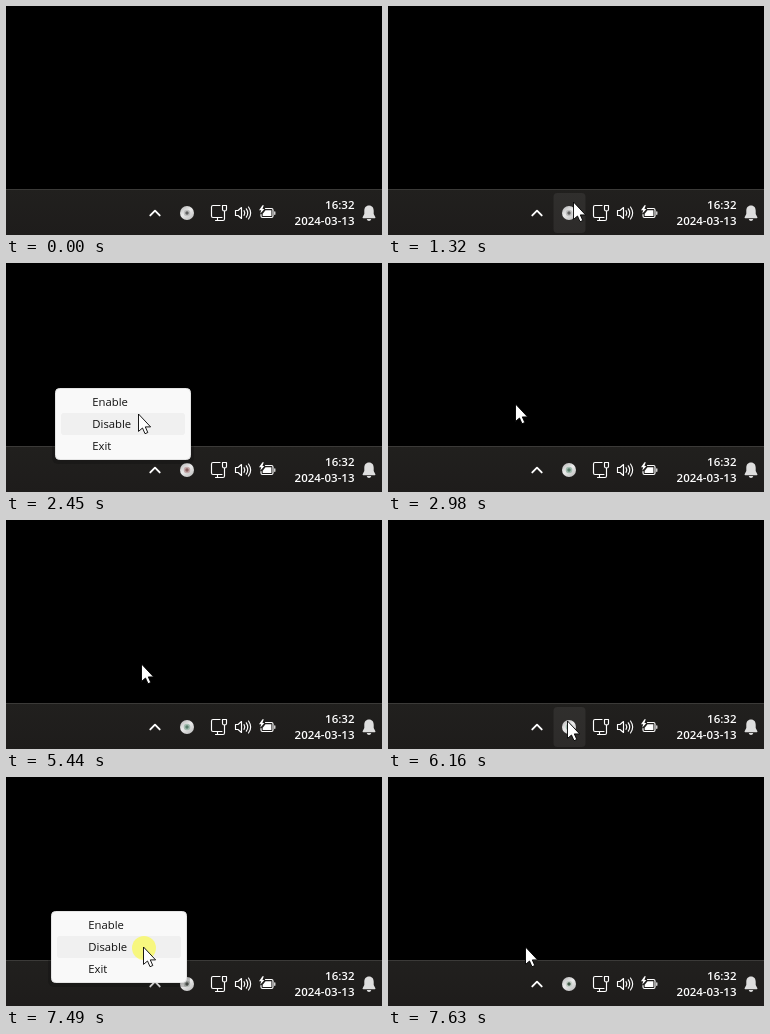
An HTML page for the animation above (8000 ms loop, 376 px wide and 229 px high).

```html
<!DOCTYPE html>
<html lang="en">
<head>
<meta charset="utf-8">
<title>Tray menu</title>
<style>
  html, body { margin: 0; width: 100%; height: 100%; overflow: hidden; background: #000; }
  svg { display: block; width: 376px; height: 229px; }
  text { font-family: "Open Sans", "Noto Sans", sans-serif; }
  .clock { font-size: 11.5px; font-weight: 600; fill: #fff; text-anchor: end; }
  .item { font-size: 11.3px; font-weight: 500; fill: #111; }
  .line { fill: none; stroke: #fff; stroke-width: 1.15; stroke-linejoin: round; stroke-linecap: round; }
</style>
</head>
<body>
<svg viewBox="0 0 376 229">
  <defs>
    <linearGradient id="bar" x2="0" y2="1">
      <stop offset="0" stop-color="#21201e"/>
      <stop offset="1" stop-color="#1e1c1b"/>
    </linearGradient>
    <linearGradient id="disc" x1=".15" x2=".85" y2="1">
      <stop offset="0" stop-color="#b8b8b8"/>
      <stop offset=".45" stop-color="#ececec"/>
      <stop offset="1" stop-color="#bcbcbc"/>
    </linearGradient>
  </defs>

  <rect width="376" height="229"/>
  <rect y="183" width="376" height="46" fill="url(#bar)"/>
  <rect y="183" width="376" height="1" fill="#3b3a38"/>

  <rect id="hover" x="165.5" y="187" width="32" height="40" rx="4" fill="#fff" fill-opacity=".065"/>
  <path class="line" d="M144.3 209.4L149 204.7L153.7 209.4" style="stroke-width:1.9"/>

  <circle cx="181" cy="207" r="7" fill="url(#disc)"/>
  <circle id="ring" cx="181" cy="207" r="3.3"/>
  <circle id="dot" cx="181" cy="207" r="1.7"/>

  <g class="line">
    <path d="M214 199.5H207Q205.5 199.5 205.5 201V210Q205.5 211.5 207 211.5H216M209.5 214.5H217Q218.5 214.5 218.5 213V205M211.5 211.5V214.5"/>
    <path d="M216.5 199.5H220.5V203.5Q220.5 205 218.5 205Q216.5 205 216.5 203.5Z"/>
    <path d="M229.5 204.5H232L235.5 201.5V212.5L232 209.5H229.5Z"/>
    <path d="M238 204.7Q239.6 207 238 209.3M240.3 202.8Q243.2 207 240.3 211.2M242.5 201Q246.8 207 242.5 213"/>
    <path d="M259.5 202.5H265.5Q267 202.5 267 204V210Q267 211.5 265.5 211.5H256.5Q255 211.5 255 210V208.5M268.8 205.7V208.3"/>
  </g>
  <path d="M259.5 204.2H265.4V209.9H256.7V207.8Z" fill="#fff"/>
  <path d="M256.5 199.3L253 204.3H255.2L254.2 207.8L258.4 203H256.4L257.8 199.3Z" fill="#fff"/>

  <text class="clock" x="348.5" y="203">16:32</text>
  <text class="clock" x="348.5" y="219">2024-03-13</text>
  <path d="M363 199.5C359.8 199.5 358.3 202 358.3 204.7V208L356.6 211.3Q356.4 212.2 357.3 212.2H368.7Q369.6 212.2 369.4 211.3L367.7 208V204.7C367.7 202 366.2 199.5 363 199.5ZM360.7 213H365.3Q364.8 215 363 215T360.7 213Z" fill="#dedede"/>

  <g id="menu">
    <rect x="-3" y="1" width="142" height="75" rx="6" fill="#000" fill-opacity=".18"/>
    <rect x=".5" y=".5" width="135" height="71" rx="4" fill="#f9f9f9" stroke="#e4e4e4"/>
    <rect id="pick" x="6" width="124" height="22" rx="3" fill="#f0f0f0"/>
    <text class="item" x="37.3" y="18">Enable</text>
    <text class="item" x="37.3" y="40">Disable</text>
    <text class="item" x="37.3" y="62">Exit</text>
  </g>

  <circle id="halo" r="12" fill-opacity=".47"/>
  <path id="arrow" d="M-.5 -1V16.4L3.5 13L6 18.7L8.8 17.5L6.3 11.9H11.6Z" fill="#fff" stroke="#000" stroke-width=".9"/>
</svg>
<script>
const LOOP = 8000, ROW = 22;
const $ = id => document.getElementById(id);

// Pointer moves: start, end, steps, then from / bend / to
const moves = [
  [520, 1320, 12, [94, -30], [125, 70], [186, 197]],
  [2250, 2450, 4, [186, 197], [158, 172], [133, 152]],
  [2780, 2980, 3, [133, 152], [130, 147], [128, 142]],
  [5440, 6230, 13, [128, 142], [155, 150], [181, 205]],
  [6760, 6890, 3, [181, 205], [158, 188], [138, 171]]
];
// Menus: open, fully shown, close, x, y
const menus = [
  [1590, 1660, 2710, 49, 125],
  [6370, 6430, 7630, 45, 134]
];
// Clicks: from, to, colour
const clicks = [
  [1520, 1660, '#f00'],
  [2580, 2710, '#ff0'],
  [6300, 6430, '#f00'],
  [7490, 7630, '#ff0']
];
// Tray icon: from, ring, dot
const tints = [
  [0, '#c0c0c0', '#606060'],
  [1590, '#c4abab', '#8b5f5f'],
  [2710, '#a4bcb0', '#587f6c'],
  [6300, '#bcc0bd', '#565c58'],
  [7630, '#c6cec8', '#405a47']
];

const during = (list, t) => list.find(([a, b]) => t >= a && t < b);
const latest = (list, t) => list.filter(e => e[0] <= t).pop();
const show = (el, on) => el.setAttribute('visibility', on ? 'visible' : 'hidden');
const place = (el, x, y) => el.setAttribute('transform', `translate(${x} ${y})`);

function pointer(t) {
  const move = latest(moves, t);
  if (!move) return null;
  const [t0, t1, n, a, b, c] = move;
  const step = Math.floor((t - t0) / (t1 - t0) * (n - 1) + 1e-6) + 1;
  const p = Math.min(1, step / n);
  const e = 1 - (1 - p) ** 2, r = 1 - e;
  return a.map((v, i) => Math.round(r * r * v + 2 * r * e * b[i] + e * e * c[i]));
}

function draw(t) {
  const pos = pointer(t);
  const [x, y] = pos || [-99, -99];
  show($('arrow'), pos);
  place($('arrow'), x, y);
  show($('hover'), x >= 166 && x < 198 && y >= 187);

  const menu = menus.find(m => t >= m[0] && t < m[2]);
  let row = -1;
  if (menu) {
    const [, full, , mx, my] = menu;
    place($('menu'), mx, my);
    $('menu').setAttribute('opacity', t < full ? .6 : 1);
    if (x > mx + 6 && x < mx + 130) row = Math.floor((y - my - 3) / ROW);
  }
  show($('menu'), menu);
  show($('pick'), row >= 0 && row < 3);
  $('pick').setAttribute('y', 3 + row * ROW);

  const click = during(clicks, t);
  show($('halo'), click);
  if (click) {
    place($('halo'), x, y);
    $('halo').setAttribute('fill', click[2]);
  }

  const [, ring, dot] = latest(tints, t);
  $('ring').setAttribute('fill', ring);
  $('dot').setAttribute('fill', dot);
}

const start = performance.now();
function tick() {
  draw((performance.now() - start) % LOOP);
  requestAnimationFrame(tick);
}
tick();
</script>
</body>
</html>
```
